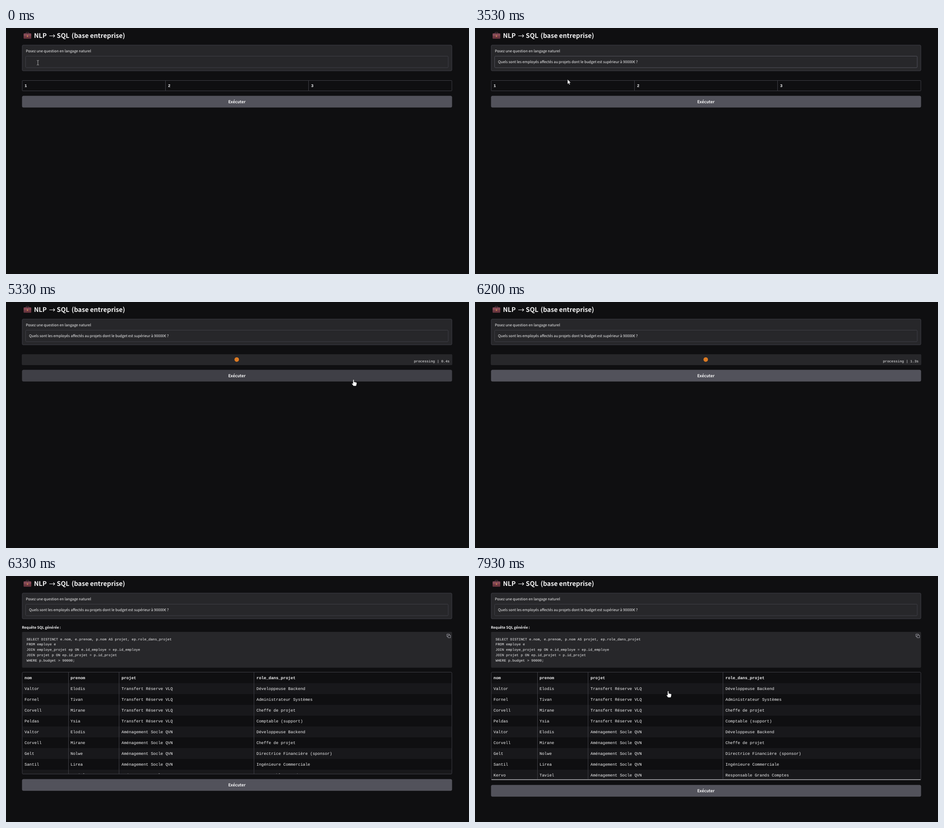
Write an HTML page that moves like this. It is 1026 px wide and 546 px high and loops after 8 s.

```html
<!DOCTYPE html>
<html lang="fr">
<head>
<meta charset="utf-8">
<title>NLP → SQL</title>
<style>
  html, body { margin: 0; width: 100%; height: 100%; overflow: hidden; background: #0f0f11; }
  svg { display: block; }
  text { fill: #f4f4f5; text-rendering: geometricPrecision; white-space: pre; }
  .sans { font-family: "Noto Sans CJK JP", "Noto Sans CJK SC", "Noto Sans CJK", "Open Sans", sans-serif; }
  .mono { font-family: "Liberation Mono", "DejaVu Sans Mono", monospace; }
  .bold { font-weight: 700; }
  .panel { fill: #27272a; }
  .edge { stroke: #3f3f46; }
  .none { fill: none; }
  .pointer { fill: #fff; stroke: #18181b; stroke-width: .7; stroke-linejoin: round; }
</style>
</head>
<body>
<svg id="stage" width="1026" height="546" viewBox="0 0 1026 546"></svg>
<script>
const LOOP = 8000, CLICK = 4860, RESULT = 6300, GROWN = 6380;
const REST_Y = 150.5;

const text = (x, y, size, str, cls = 'sans', extra = '') =>
  `<text x="${x}" y="${y}" font-size="${size}" class="${cls}" ${extra}>${str}</text>`;
const rect = (x, y, w, h, cls, extra = '') =>
  `<rect x="${x}" y="${y}" width="${w}" height="${h}" class="${cls}" ${extra}/>`;
const path = (d, cls, extra = '') => `<path d="${d}" class="${cls}" ${extra}/>`;
const group = (id, body, extra = '') => `<g id="${id}" ${extra}>${body}</g>`;

const question = 'Quels sont les employés affectés au projets dont le budget est supérieur à 90000€ ?';
const sql = [
  'SELECT DISTINCT e.nom, e.prenom, p.nom AS projet, ep.role_dans_projet',
  'FROM employe e',
  'JOIN employe_projet ep ON e.id_employe = ep.id_employe',
  'JOIN projet p ON ep.id_projet = p.id_projet',
  'WHERE p.budget &gt; 90000;'
];
const projects = ['Transfert Réserve VLQ', 'Aménagement Socle QVN'];
const rows = [
  ['Valtor', 'Elodis', projects[0], 'Développeuse Backend'],
  ['Fornel', 'Tivan', projects[0], 'Administrateur Systèmes'],
  ['Corvell', 'Mirane', projects[0], 'Cheffe de projet'],
  ['Peldas', 'Ysia', projects[0], 'Comptable (support)'],
  ['Valtor', 'Elodis', projects[1], 'Développeuse Backend'],
  ['Corvell', 'Mirane', projects[1], 'Cheffe de projet'],
  ['Gelt', 'Nolwe', projects[1], 'Directrice Financière (sponsor)'],
  ['Santil', 'Lirea', projects[1], 'Ingénieure Commerciale'],
  ['Kervo', 'Taviel', projects[1], 'Responsable Grands Comptes']
];
const columns = [41, 143, 256, 555];
const cells = (list, y, cls) => list.map((s, i) => text(columns[i], y, 9.03, s, cls)).join('');

const briefcase =
  rect(44.4, 9.7, 6.2, 5, 'none', 'rx="1.2" stroke="#4b3540" stroke-width="1.3"') +
  rect(39, 12, 17, 11.8, '', 'rx="1.5" fill="#6b3640"') +
  rect(39, 12, 17, 6.5, '', 'rx="1.5" fill="#844a56"') +
  rect(46.3, 16.4, 2.6, 3, '', 'rx=".6" fill="#d48a50"');

const header = briefcase +
  text(62, 22.3, 14.15, 'NLP', 'sans bold') +
  path('M96 17.5H108M104.8 14.3L108 17.5L104.8 20.7', 'none', 'stroke="#f4f4f5" stroke-width="1.2"') +
  text(112.6, 22.3, 14.15, 'SQL', 'sans bold') +
  text(145.3, 22.3, 14.15, '(base entreprise)', 'sans bold');

const form = rect(36, 38, 952, 57, 'panel edge', 'rx="2"') +
  text(44, 54.2, 8.08, 'Posez une question en langage naturel') +
  rect(43.5, 62.5, 936.5, 25.5, 'panel edge', 'rx="2" id="input"') +
  group('query', text(51, 77.8, 8.08, question)) +
  rect(0, 70, 1, 11, '', 'id="caret" fill="#f4f4f5"');

const emptyTable = rect(36, 116.5, 952, 23, 'none edge', 'rx="1"') +
  path('M353.5 116.5v23M670.5 116.5v23', 'edge') +
  [41, 359, 676].map((x, i) => text(x, 131.4, 9.03, i + 1, 'mono bold')).join('');

const loader = rect(35.5, 116, 953, 24, 'panel', 'rx="2"') +
  '<circle cx="511.3" cy="127.7" r="5" fill="#dd7a22"/>' +
  text(983, 134.3, 7.75, '', 'mono', 'id="status" text-anchor="end"');

const result = text(35.3, 116.8, 7.83, 'Requête SQL générée :', 'sans bold') +
  rect(35.5, 124, 953, 79.5, 'panel', 'rx="2"') +
  sql.map((s, i) => text(45.5, 142.7 + 11.7 * i, 7.78, s, 'mono')).join('') +
  path('M979.5 131.5h5.5v5.5h-5.5zM979 134.5h-2v-5.5h5.5v2', 'none', 'stroke="#a1a1aa" stroke-width=".9"') +
  '<clipPath id="clip"><rect id="window" x="36" y="214" width="952"/></clipPath>' +
  group('rows',
    rows.map((r, i) =>
      rect(36, 238 + 24 * i, 952, 24, '', `fill="${i % 2 ? '#0f0f11' : '#18181b'}"`) +
      cells(r, 253.2 + 24 * i, 'mono')).join('') +
    cells(['nom', 'prenom', 'projet', 'role_dans_projet'], 229.2, 'mono bold') +
    path('M138.5 214v240M250.5 214v240M549.5 214v240', 'edge'), 'clip-path="url(#clip)"') +
  rect(36, 213.5, 952, 0, 'none edge', 'rx="2" id="frame"') +
  rect(36.5, 451, 951, 2, '', 'id="scrollbar" fill="#8b8b8f"');

const button = rect(35.5, 0, 953, 26, '', 'rx="3.5" id="face"') +
  text(511.7, 16.7, 9, 'Exécuter', 'sans bold', 'text-anchor="middle"');

const pointers =
  path('M-2.3 -5H-.8L0 -4.4L.8 -5H2.3M0 -4.4V4.4M-2.3 5H-.8L0 4.4L.8 5H2.3', 'none', 'id="beam" stroke="#c4c4c6" stroke-width=".9"') +
  path('M0 0V10.8L2.4 8.6L4 12.2L5.9 11.4L4.3 7.8H7.6Z', 'pointer', 'id="arrow"') +
  path('M-1.2 1.1A1.2 1.2 0 0 1 1.2 1.1V5.2L6 6.3Q7.5 6.8 7.3 8.2L6.6 12.5Q6.2 14.5 4.7 14.5H.8Q-.3 14.5 -.9 13.5L-3.9 9.4Q-3.2 7.9 -1.2 9.2Z', 'pointer', 'id="hand"');

stage.innerHTML = header + form + group('blank', emptyTable) + group('busy', loader) +
  group('answer', result) + group('run', button) + group('mouse', pointers);

const el = id => document.getElementById(id);
const set = (id, name, value) => el(id).setAttribute(name, value);
const show = (id, on) => set(id, 'visibility', on ? 'visible' : 'hidden');
const clamp = v => Math.max(0, Math.min(1, v));

// Pointer positions: time, x, y
const track = [
  [0, 70.7, 77], [133, 70, 76.5], [3066, 70, 76.5], [3267, 101, 86], [3533, 204.8, 113.8],
  [3933, 409, 147], [4200, 480, 159], [4533, 521.5, 165], [4867, 521.5, 165],
  [5133, 590, 166], [5400, 830, 174], [5667, 1006, 192],
  [7333, 640, 400], [7533, 520, 335], [7733, 450, 278], [7933, 428, 255.3], [8000, 428, 255.3]
];

function locate(t) {
  const i = track.findIndex(k => k[0] > t);
  const [t0, x0, y0] = track[i - 1], [t1, x1, y1] = track[i];
  const f = (t - t0) / (t1 - t0);
  return [x0 + (x1 - x0) * f, y0 + (y1 - y0) * f];
}

const blinks = [265, 795, 1325, 2125, 2725, 3260, 3795, 4325];

function draw(t) {
  const done = t >= RESULT, grown = t >= GROWN;
  const focused = t >= 265 && t < CLICK, pasted = t >= 1660;
  const [x, y] = locate(t);
  const overButton = !done && y > 151 && y < 176 && x < 988;
  const pointing = overButton || done;
  const typing = y < 88 && t < CLICK;

  set('input', 'style', `stroke:${focused ? '#52525b' : '#3f3f46'}`);
  show('query', pasted);
  const count = blinks.filter(b => b <= t).length;
  show('caret', focused && (pasted ? t < 2125 || count % 2 === 1 : count % 2 === 1));
  set('caret', 'x', pasted ? 362 : 51);

  show('blank', !done);
  show('busy', !done && t >= CLICK);
  set('busy', 'opacity', clamp((t - 4920) / 150));
  const seconds = (Math.floor(Math.max(0, t - 4880) / 100) / 10).toFixed(1) + 's';
  el('status').textContent = t < 5000 ? seconds : 'processing | ' + seconds;

  show('answer', done);
  const height = grown ? 239 : 226;
  set('window', 'height', height);
  set('frame', 'height', height);
  show('scrollbar', t >= 7325);

  set('run', 'transform', `translate(0 ${done ? (grown ? 464 : 451) - .3 : REST_Y})`);
  set('face', 'fill', overButton && t >= CLICK ? '#3f3f46' : '#52525b');

  set('mouse', 'transform', `translate(${x} ${y})`);
  const visible = t < 5700 || t >= 7325;
  show('beam', visible && typing);
  show('arrow', visible && !typing && !pointing);
  show('hand', visible && pointing);
}

// The screen refreshes 15 times a second
const start = performance.now();
function tick() {
  const t = (performance.now() - start) % LOOP;
  draw(Math.min(LOOP - 1, Math.floor((t + 5) * .015) / .015));
  requestAnimationFrame(tick);
}
tick();
</script>
</body>
</html>
```
